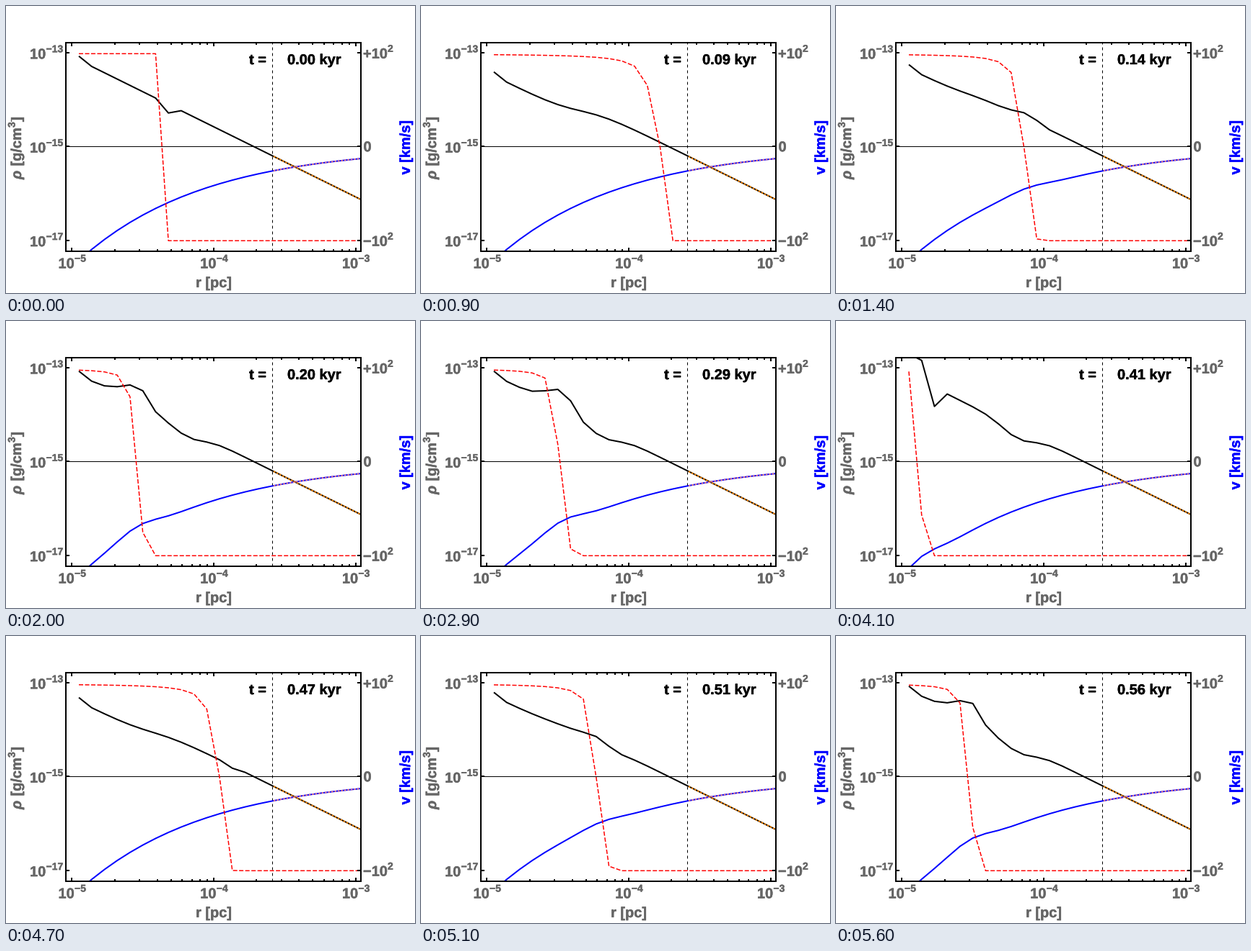
Recreate the animation shown at these times as a matplotlib script. Size 567x399 px, loop 5700 ms.

```python
import numpy as np
import matplotlib.pyplot as plt
from matplotlib import patheffects
from matplotlib.animation import FuncAnimation
from matplotlib.patches import Rectangle

W, H, DPI = 567, 399, 64
PT = 72 / DPI  # points per pixel
FRAMES, STEP = 57, 100
LEFT, TOP, RIGHT, BOTTOM = 83, 51, 492, 341
ZERO, SPAN = 195.2, 130.4  # middle line and distance to the outer ticks
DECADE, X5 = 196.7, 91.3
PITCH = 17.73  # pixels between radial cells
GRAY = "#666666"

plt.rcParams["lines.scale_dashes"] = False
plt.rcParams["font.family"] = "Liberation Sans"
plt.rcParams["font.weight"] = "bold"

cell = np.arange(23)
xs = 101 + PITCH * cell

# Undisturbed envelope: power laws for density and free-fall speed
envelope = 268.6 - 8.79 * (22 - cell)
freefall = ZERO + 17 * 10 ** (0.489 * PITCH / DECADE * (22 - cell))

# Key states of the flickering front: position, swept-up shell,
# hollowed-out interior and notch at the first neutral cell
TIMES = [0, 9, 20, 29, 41, 47, 56]
FRONT = [6.5, 13.0, 4.5, 5.27, 0.66, 11.05, 4.68]
SHELL = [0, 0, 25, 26, 30, 0, 26]
HOLLOW = [0, 22, 0, 0, 0, 16, 0]
NOTCH = [12, 0, 0, 0, 32, 3, 0]


def bump(d, width):
    return np.exp(-(d / width) ** 2)


def density(front, shell, hollow, notch):
    d = cell - front - 0.2
    y = envelope - shell * bump(d, np.where(d < 0, 1.8, 0.9))
    y += 0.45 * shell * bump(cell - 8.5, 1.7)
    y += hollow / (1 + np.exp((cell - 0.52 * front) / 1.2))
    y += notch * (cell == np.ceil(front + 0.4))
    y[0] -= 5.5
    return y


def speed(front, shell):
    return freefall - 0.38 * shell * bump(cell - front - 0.1, 2)


def ionization(front, absorb):
    """Slow fall-off behind the front, short tail ahead of it."""
    s = cell - front
    behind = 3.4 * front * absorb / np.maximum(-s, 0.05) ** 1.35
    ahead = absorb * np.clip(1 - s, 0, 1) ** 2
    return np.where(s < 0, 66.3 + np.minimum(behind, 130), 326.3 - 130 * ahead)


fig = plt.figure(figsize=(W / DPI, H / DPI), dpi=DPI, facecolor="white")
ax = fig.add_axes([0, 0, 1, 1])
ax.set_xlim(0, W)
ax.set_ylim(H, 0)
ax.axis("off")
clip = Rectangle((LEFT, TOP), RIGHT - LEFT, BOTTOM - TOP, transform=ax.transData)


def line(x, y, color, width, dash=None, z=3):
    style = (0, tuple(d * PT for d in dash)) if dash else "-"
    item, = ax.plot(x, y, color=color, lw=width * PT, ls=style, zorder=z,
                    dash_capstyle="butt", solid_capstyle="butt")
    item.set_clip_path(clip)
    return item


def label(x, y, text, color=GRAY, size=20, **kw):
    heavy = patheffects.withStroke(linewidth=0.4 * PT, foreground=color)
    return ax.text(x, y, text, color=color, fontsize=size * PT, ha="left",
                   va="baseline", rotation_mode="anchor",
                   path_effects=[heavy], **kw)


def power(x, y, base, exp):
    label(x, y, base)
    label(x + (22.5 if base == "10" else 34), y - 9, exp, size=14)


def tick(x, y, dx, dy):
    ax.plot([x, x + dx], [y, y + dy], color="black", lw=2 * PT,
            solid_capstyle="butt", zorder=6)


# Frame and ticks
ax.add_patch(Rectangle((LEFT, TOP), RIGHT - LEFT, BOTTOM - TOP, fill=False,
                       ec="black", lw=2 * PT, zorder=6))
for decade in range(3):
    for m in range(1, 10):
        x = X5 + DECADE * (decade + np.log10(m))
        if x < RIGHT:
            size = 5 if m == 1 else 3
            tick(x, TOP, 0, size)
            tick(x, BOTTOM, 0, -size)
for k in (-1, 0, 1):
    y = ZERO + k * SPAN
    tick(LEFT, y, 5, 0)
    tick(RIGHT, y, -5, 0)
    power(33, y + 8.5, "10", f"−{15 + 2 * k}")
for k in range(3):
    power(72.5 + DECADE * k, 364.5, "10", f"−{5 - k}")

# Labels
power(495, ZERO - SPAN + 8, "+10", "2")
label(495.5, ZERO + 7, "0")
power(495, ZERO + SPAN + 8, "−10", "2")
label(263, 391, "r [pc]")
label(21, 241, "ρ", rotation=90, style="italic")
label(21, 222.5, "[g/cm", rotation=90)
label(12.5, 169, "3", size=14, rotation=90)
label(21, 161, "]", rotation=90)
label(560, 234.5, "v [km/s]", "blue", rotation=90)
label(337, 81, "t =", "black", zorder=7)
clock = label(390, 81, "", "black", zorder=7)

# Guides
line([LEFT, RIGHT], [195, 195], "black", 1, z=2)
line([369, 369], [BOTTOM, TOP], "black", 1, (4, 4), z=2)

# Curves
rho = line(xs, envelope, "black", 2)
vel = line(xs, freefall, "blue", 2, z=3.2)
ion = line(xs, envelope, "red", 1.5, (6, 2.5), z=3.4)

# Dotted outer solution over both curves
outer = np.linspace(371, xs[-1], 40)
line(outer, np.interp(outer, xs, envelope), "#ff8c00", 2, (2.5, 2), z=4)
line(outer, np.interp(outer, xs, freefall), "#f08080", 1.8, (2.5, 2), z=4)


def draw(n):
    front, shell, hollow, notch = (np.interp(n, TIMES, track)
                                   for track in (FRONT, SHELL, HOLLOW, NOTCH))
    rho.set_ydata(density(front, shell, hollow, notch))
    vel.set_ydata(speed(front, shell))
    ion.set_ydata(ionization(front, min(1, n / 4)))
    clock.set_text(f"{n / 100:.2f} kyr")
    return rho, vel, ion, clock


anim = FuncAnimation(fig, draw, frames=FRAMES, interval=STEP, repeat=True,
                     repeat_delay=0, blit=False)
plt.show()
```
